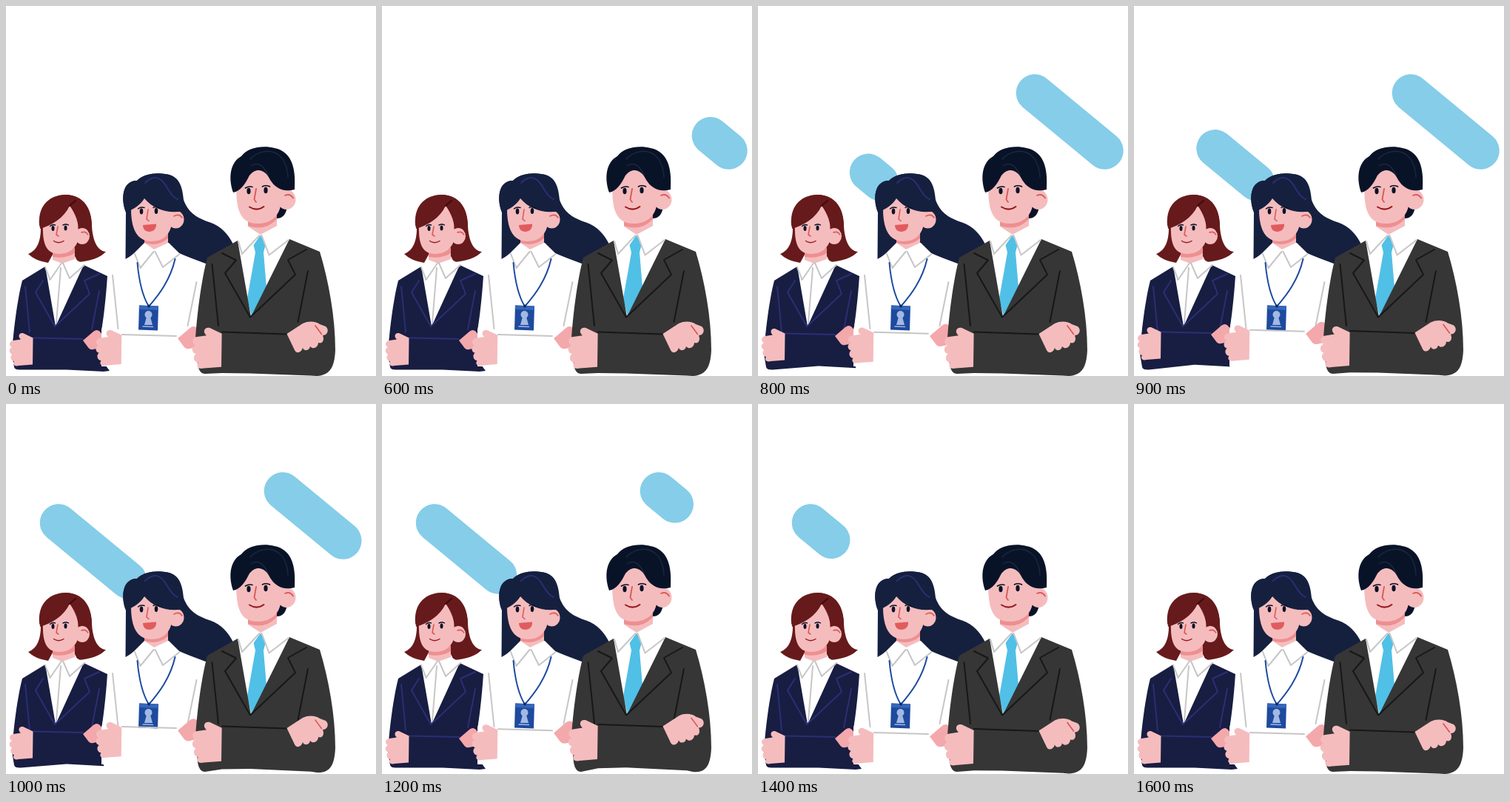
Recreate the animation shown at these times as an HTML page. Size 500x500 px, loop 6100 ms.

```html
<!DOCTYPE html>
<html lang="en">
<head>
<meta charset="utf-8">
<title>Team</title>
<style>
html, body { margin: 0; width: 100%; height: 100%; overflow: hidden; background: #fff; }
svg { display: block; width: 100%; height: 100%; }
.line { fill: none; stroke-linecap: round; stroke-linejoin: round; stroke-width: 2; }
.thin { stroke-width: 1.4; }
.grey { stroke: #c6c6c6; }
.seam { stroke: #2b2e74; }
.black { stroke: #171717; }
.red { stroke: #dc5a57; stroke-width: 1.6; }
.lip { stroke: #981b1e; }
.ink { stroke: #0a1226; }
.skin { fill: #f5bcbe; }
.palm { fill: #f3a8ac; }
.shade { fill: #ee8f90; }
.navy { fill: #181d42; }
.mane { fill: #15203f; }
.maroon { fill: #671a1b; }
.jet { fill: #091327; }
.suit { fill: #363636; }
.white { fill: #fff; }
.pill { stroke: #85cde9; stroke-width: 50.5; stroke-linecap: round; }
</style>
</head>
<body>
<svg viewBox="0 0 500 500">
  <defs>
    <path id="fist" d="M36.500 449L24 443C18 441 15 447 20 451L10 452.500C4 453 3.500 460 8 461.500C3 464 4 470 8.500 471C4.500 474 6.500 480 11 480.500C8 485 12 488 17 486.500L36 485Z" transform="translate(0 -0.500)"/>
    <path id="grip" d="M104 452L118 440C123 436 126 438 130 444L131 457L123 463L118 464C114 465 112 463 110 460Z"/>
  </defs>

  <line id="pillR" class="pill"/>
  <line id="pillL" class="pill"/>

  <g id="left">
    <path class="maroon" d="M45 296C43 268 60 255 82 255C105 256 116 274 116 297C117 316 123 331 135 332C128 340 113 345 97 346L92 336L63 336L57 347C44 345 35 340 30 335C43 330 47 316 47 300Z"/>
    <path class="skin" d="M63 328H93V347L76 353L63 347Z"/>
    <path class="shade" d="M63 331Q80 338 93 326V334Q80 342 63 339Z"/>
    <path class="skin" d="M50 292C49 318 52 335 72 335C87 335 94 326 97 318L98 285L84 266Z"/>
    <ellipse class="skin" cx="103" cy="311" rx="10" ry="11"/>
    <path class="maroon" d="M46 301C42 270 60 255 82 255C105 257 117 275 116 302Q111 298 104 299L98 301C97 288 92 278 86 270C78 287 62 296 46 301Z"/>
    <path class="line" stroke="#3c0b0e" d="M86 270L94 263"/>
    <ellipse cx="63.500" cy="300.500" rx="2" ry="3.600" fill="#0a1226"/>
    <ellipse cx="80.500" cy="300" rx="2" ry="3.600" fill="#0a1226"/>
    <path class="line thin ink" d="M59.500 297.500Q63 294.500 66.500 296M77 296Q81 294 84.500 296"/>
    <path class="line red" d="M70 298L68 309L71 311"/>
    <path class="line lip thin" d="M64.500 317.500Q71 322 78 317.500"/>
    <path class="line red" d="M102 306Q108 304 110.500 309"/>
    <path class="white" d="M63 343L52 353L67 436L107 350L93 342L76 348Z"/>
    <path id="bodyA" class="navy"/>
    <path class="line grey" d="M53 353L59.500 370L75 347.500M77 347.500L86 368L106 350M74 354L68 428"/>
    <path class="line seam" d="M50 371L40 387L66 433L113 389L106 371L126 362M26 379L32 441M126 385L116 437"/>
    <g id="armA">
      <path class="line seam" d="M37 448.500L104 450"/>
      <use href="#grip" class="palm"/>
      <use href="#fist" class="skin"/>
    </g>
  </g>

  <g id="middle">
    <path class="mane" d="M161.500 342L162 278C155 261 157 236 177 236C186 227 202 225 215 227C231 229 238 238 240 262C247 281 260 287 276 292.500C291 298 301 309 307 322V352H275L234 334L220 320H188Q174 336 161.500 342Z"/>
    <path class="skin" d="M187 308H219V322L201 330L187 321Z"/>
    <path class="shade" d="M187 314Q205 320 219 306V314Q205 326 187 320Z"/>
    <path class="skin" d="M169 274C169 300 176 318 197 318C212 318 220 309 223 299L226 272L190 255Z"/>
    <ellipse class="skin" cx="229.500" cy="288.500" rx="11" ry="12"/>
    <path class="mane" d="M162 279C155 261 157 236 177 236C186 227 202 225 215 227C233 229 239 242 240 277C218 281 200 275 187 260C182 268 174 274 162 279Z"/>
    <path class="line seam" d="M188 239C200 227 210 231 218 246C224 256 228 260 232 261"/>
    <ellipse cx="183" cy="277.500" rx="2.300" ry="3.900" fill="#0a1226"/>
    <ellipse cx="203" cy="277" rx="2.300" ry="3.900" fill="#0a1226"/>
    <path class="line thin ink" d="M178.500 274Q182 271 187 272.500M199 272.500Q203 270.500 207.500 273"/>
    <path class="line red" d="M192 275L190 288L193 290.500"/>
    <path d="M185 296L203 294.500C203.500 301 199 305 193.500 305C188 305 185 301 185 296Z" fill="#e15b5e"/>
    <path class="line red" d="M227 284Q234 280 238 286"/>
    <path class="white" d="M187 320L173 334L141 361C138 390 134 415 129 438V487H262L275 350L235 335L219 320L200 329Z"/>
    <path class="line grey" d="M174 335L181.500 354L199.500 332M201.500 332L212 353L234 335.500M144 364L151.500 436M257.500 373L245.500 432"/>
    <path class="line" stroke="#1d4b9f" d="M177.500 347C180 375 185 393 193 406C207 390 222 370 228.500 342"/>
    <path fill="#1e4a9e" d="M180 404.500L206 405.500L205 438.500L179 437.500Z"/>
    <path fill="#3566b8" d="M180 404.500L206 405.500L205.800 411L179.800 410Z"/>
    <circle cx="193" cy="405.500" r="2" fill="#132a62"/>
    <path fill="#a3b9e3" d="M187 431L190 420H195L198 431Z"/>
    <circle cx="192.500" cy="417" r="5" fill="#a3b9e3"/>
    <path class="line thin" stroke="#a3b9e3" d="M185 433L198.500 433.500"/>
    <g id="armB">
      <path class="line grey" d="M157 444L230 446"/>
      <use href="#grip" class="palm" transform="translate(112.500 -70.500) scale(1.15)"/>
      <use href="#fist" class="skin" transform="translate(116.500 -44) scale(1.09)"/>
    </g>
  </g>

  <g id="right">
    <path class="jet" d="M355 245H378L380 270C379 281 374 287 366 287Z"/>
    <path class="skin" d="M327 280H366V299L344 310L327 300Z"/>
    <path class="shade" d="M327 288Q350 296 366 279V288Q350 305 327 297Z"/>
    <path class="skin" d="M311 240C311 272 314 294 340 294C358 294 367 284 370 274L380 240L340 215Z"/>
    <ellipse class="skin" cx="379" cy="261.500" rx="12.500" ry="13.500"/>
    <path class="jet" d="M307 252C300 232 303 211 318 203C327 191 347 188 363 192C386 197 392 218 390 248C374 252 364 246 357 235C351 221 338 217 329 229C323 241 317 250 307 252Z"/>
    <path class="line thin" stroke="#1b283c" d="M330 207C345 190 379 190 381 231M331 216C342 209 349 218 354 228"/>
    <ellipse cx="328" cy="250" rx="2.600" ry="4.300" fill="#0a1226"/>
    <ellipse cx="351" cy="249" rx="2.600" ry="4.300" fill="#0a1226"/>
    <path class="line ink" style="stroke-width:1.7" d="M323.500 246Q328 243 333 244.500M346.500 244Q351 241.500 356.500 244"/>
    <path class="line red" style="stroke-width:1.9" d="M338 247L335.500 261.500L338 265"/>
    <path class="line lip" d="M329 271.500Q339 278 348.500 271"/>
    <path class="line red" style="stroke-width:1.9" d="M377 256Q384 253 388 259.500"/>
    <path class="white" d="M327 298L312 317L331 421L384 315L366 297L344 309Z"/>
    <path fill="#51c0e6" d="M344 309.500L334.500 323L337 333L326 395L332 420L352 380L348 333L351 322Z"/>
    <path id="bodyC" class="suit"/>
    <path class="line grey" d="M314 318L319 335L342.500 310M345.500 310L355.500 336.500L382 316"/>
    <path class="line black" d="M292 334L311 343.500L296 361L330 420.500L391 363L381 343L406 329M278.500 349L287 432M408 358L394.500 427"/>
    <g id="armC">
      <path class="line black" d="M292 440.500L379 443.500"/>
      <use href="#fist" class="skin" transform="translate(246 -118) scale(1.25)"/>
      <path class="skin" d="M379.500 443L401 429C409 425 419 426 424 430L432 433C437 437 435 445 428 445C431 452 427 457 422 455C422 461 415 465 411 460C410 466 403 467 401 462C399 469 392 470 390 465Z"/>
      <path class="line" stroke="#d9524f" style="stroke-width:1.6" d="M418 432L426.500 443.500"/>
    </g>
  </g>
</svg>
<script>
const LOOP = 6100, STEP = 100, LIFT = 8;
const el = id => document.getElementById(id);
const set = (id, attrs) => {
  for (const name in attrs) el(id).setAttribute(name, attrs[name]);
};

// Smooth rise and fall around a peak time
function lift(t, peak, half) {
  const u = Math.min(1, Math.abs(t - peak) / half);
  return -LIFT * (1 + Math.cos(Math.PI * u)) / 2;
}

// Beam grows from its base to its tip, then shrinks into the tip
const beams = [
  { id: "pillR", base: [468.500, 195.500], tip: [374, 117.500],
    start: 600, grown: 0.26, grow: 0.39, leave: 1000, left: 0.86, shrink: 0.315 },
  { id: "pillL", base: [165, 238], tip: [71, 160.500],
    start: 800, grown: 0.17, grow: 0.42, leave: 1200, left: 0.915, shrink: 0.3075 }
];

function drawBeam(b, t) {
  const head = Math.min(1, b.grown + b.grow * (t - b.start) / STEP);
  const rest = Math.min(1, b.left - b.shrink * (t - b.leave) / STEP);
  const at = (p, i) => b.base[i] + (b.tip[i] - b.base[i]) * p;
  const tail = 1 - rest;
  set(b.id, {
    x1: at(tail, 0), y1: at(tail, 1), x2: at(head, 0), y2: at(head, 1),
    visibility: t >= b.start && rest > 0 ? "visible" : "hidden"
  });
}

function draw(time) {
  const t = Math.floor((time % LOOP) / STEP) * STEP;
  beams.forEach(b => drawBeam(b, t));

  const a = lift(t, 900, 300);
  const b = lift(t, 1020, 400);
  const c = lift(t, 1150, 350);
  set("armA", { transform: `translate(0 ${a})` });
  set("armB", { transform: `translate(0 ${b})` });
  set("armC", { transform: `translate(0 ${c})` });

  set("bodyA", { d: `M53 352L22 371C15 398 10 440 8 470L11 488Q12 492 20 491.500
    L82 ${491.500 + a * 0.85}L132 ${494 + a * 0.8}L${140 + a * 1.3} ${493 + a * 0.7}
    L129 478V440C132 420 135 395 137 365L105 350L67 433Z` });
  set("bodyC", { d: `M313 317L272 340C263 375 258 420 256 450L259 484Q261 497 269 497
    L292 ${496 + c * 0.5}L330 ${496.500 + c * 0.7}L412 ${499.500 + c * 0.55}L420 ${500 + c * 0.4}
    C438 499 444 488 445 465C445 420 436 372 424 332L383 315L331 420Z` });
}

const began = performance.now();
function tick() {
  draw(performance.now() - began);
  requestAnimationFrame(tick);
}
tick();
</script>
</body>
</html>
```
